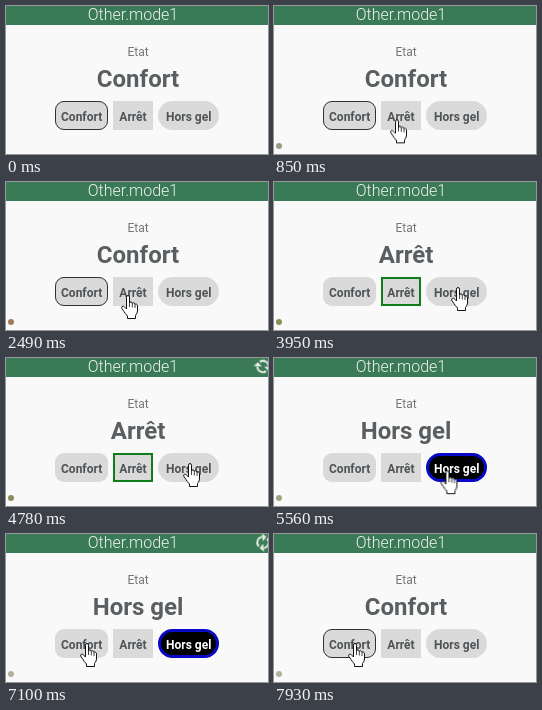
Recreate the animation shown at these times as an HTML page. Size 262 px wide and 148 px high, loop 8 s.

```html
<!DOCTYPE html>
<html lang="fr">
<head>
<meta charset="utf-8">
<title>Other.mode1</title>
<style>
html, body { margin: 0; width: 100%; height: 100%; overflow: hidden; background: #f9f9f9; }
svg { display: block; width: 100%; height: 100%; font-family: Roboto, sans-serif; }
svg * { animation-duration: 8s; animation-iteration-count: infinite; animation-timing-function: step-end; }

.title { font-size: 16px; font-weight: 300; fill: #eef4f0; }
.label { font-size: 12px; fill: #757575; }
.state text { font-size: 24px; font-weight: 700; fill: #5a5e60; }
.label, .title, .state text { text-anchor: middle; }
.btn { font-size: 12px; font-weight: 700; fill: #4f5355; }
.btn rect { fill: #dadada; }
.btn .ring { fill: none; }

/* selected mode: Confort, Arrêt, Hors gel, Confort */
.comfort { animation-name: comfort; }
.off { animation-name: off; }
.frost { animation-name: frost; }
.frost-text { animation-name: frost-text; }
@keyframes comfort { 0% { opacity: 1 } 32% { opacity: 0 } 98.25%, 100% { opacity: 1 } }
@keyframes off { 0% { opacity: 0 } 32% { opacity: 1 } 65.125%, 100% { opacity: 0 } }
@keyframes frost { 0% { opacity: 0 } 65.125% { opacity: 1 } 98.25%, 100% { opacity: 0 } }
@keyframes frost-text { 0% { fill: #4f5355 } 65.125% { fill: #fff } 98.25%, 100% { fill: #4f5355 } }

.sync { animation-name: busy; }
@keyframes busy {
  0% { opacity: 0 } 18.375% { opacity: 1 } 28.5% { opacity: 0 }
  51.875% { opacity: 1 } 62.375% { opacity: 0 }
  84.375% { opacity: 1 } 94.75%, 100% { opacity: 0 }
}
.spin { animation-name: spin; animation-timing-function: linear; }
@keyframes spin {
  0%, 18.375% { transform: rotate(0deg) } 28.5% { transform: rotate(292deg) }
  28.51%, 51.875% { transform: rotate(0deg) } 62.375% { transform: rotate(302deg) }
  62.38%, 84.375% { transform: rotate(0deg) } 94.75% { transform: rotate(299deg) }
  94.76%, 100% { transform: rotate(0deg) }
}

.dot { animation-name: dot; animation-timing-function: linear; }
@keyframes dot {
  0%, 6.24% { fill: #9c9b85; opacity: 0 }
  6.25%, 20% { fill: #9c9b85; opacity: 1 }
  28% { fill: #9c8a6a }
  31.125%, 35.5% { fill: #a27c58 }
  42.375% { fill: #96895a }
  49.375%, 59.75% { fill: #8b8f58 }
  67.75% { fill: #a09f7e }
  77.375%, 99.99% { fill: #b3b09c; opacity: 1 }
  100% { fill: #b3b09c; opacity: 0 }
}

.show { animation-name: show; }
@keyframes show { 0% { opacity: 0 } 6.25%, 100% { opacity: 1 } }
.move { animation-name: move; animation-timing-function: ease-in-out; }
@keyframes move {
  0%, 6.25% { transform: translate(150px, 138px) }
  12.25%, 28.5% { transform: translate(110px, 109px) }
  31.125% { transform: translate(115px, 113px) }
  35.5%, 42.375% { transform: translate(143px, 130px) }
  48.5%, 67.75% { transform: translate(177px, 105px) }
  72.5% { transform: translate(140px, 130px) }
  76.5%, 78.25% { transform: translate(77px, 113px) }
  79.125%, 100% { transform: translate(74px, 109px) }
}
.hand { animation-name: hand; }
.arrow { animation-name: arrow; }
@keyframes hand {
  0% { opacity: 0 } 9.25% { opacity: 1 } 33.75% { opacity: 0 }
  44.5% { opacity: 1 } 71.4% { opacity: 0 } 74.4%, 100% { opacity: 1 }
}
@keyframes arrow {
  0% { opacity: 1 } 9.25% { opacity: 0 } 33.75% { opacity: 1 }
  44.5% { opacity: 0 } 71.4% { opacity: 1 } 74.4%, 100% { opacity: 0 }
}
</style>
</head>
<body>
<svg viewBox="0 0 262 148">
  <rect width="262" height="148" fill="#f9f9f9"/>
  <rect width="262" height="19" fill="#3b7a57"/>
  <text class="title" x="127" y="14">Other.mode1</text>

  <g class="sync"><g transform="translate(257 8.5)"><g class="spin">
    <g id="half">
      <path d="M-5.6 -1A5.6 5.6 0 0 1 3.8 -4.1" fill="none" stroke="#e6efe9" stroke-width="2"/>
      <path d="M6.6 -6.6V-.8H.8Z" fill="#e6efe9"/>
    </g>
    <use href="#half" transform="rotate(180)"/>
  </g></g></g>

  <text class="label" x="132" y="50">Etat</text>
  <g class="state">
    <text class="comfort" x="132" y="81">Confort</text>
    <text class="off" x="132" y="81">Arrêt</text>
    <text class="frost" x="132" y="81">Hors gel</text>
  </g>

  <g class="btn">
    <rect x="49" y="95" width="53" height="29" rx="9"/>
    <rect class="ring comfort" x="49.5" y="95.5" width="52" height="28" rx="8.5" stroke="#2f3335"/>
    <text x="55" y="115">Confort</text>
  </g>
  <g class="btn">
    <rect x="107" y="95" width="40" height="29"/>
    <rect class="ring off" x="108" y="96" width="38" height="27" stroke="#0f7d1c" stroke-width="2"/>
    <text x="113.3" y="115">Arrêt</text>
  </g>
  <g class="btn">
    <rect x="152" y="95" width="61" height="29" rx="14.5"/>
    <g class="frost">
      <rect x="153.5" y="96.5" width="58" height="26" rx="13" style="fill:#000" stroke="#0808c8" stroke-width="3"/>
    </g>
    <text class="frost-text" x="160" y="115">Hors gel</text>
  </g>

  <circle class="dot" cx="5" cy="140" r="3"/>

  <g class="show"><g class="move" fill="#fff" stroke="#111" stroke-linejoin="round">
    <g class="hand">
      <path d="M5.5 14V2.2Q5.5 .5 7 .5T8.5 2.2V8Q8.7 6.8 10 6.9T11.3 8.5Q11.6 7.6 12.7 7.8T14 9.5Q14.4 8.8 15.4 9.1T16.5 10.8V16Q16.5 18 14.5 20.5V23.5H6.5V21Q4 18.5 3 16.5L.8 13.3Q.2 11.8 1.5 11.2T3.8 12.3Z"/>
      <path d="M8.5 8V12M11.3 8.5V12.5M14 9.5V13" fill="none" stroke-width=".8"/>
    </g>
    <path class="arrow" d="M6.5 .5V16.5L10.2 13L12.7 18.8L15 17.8L12.6 12.2H17.8Z"/>
  </g></g>
</svg>
</body>
</html>
```
